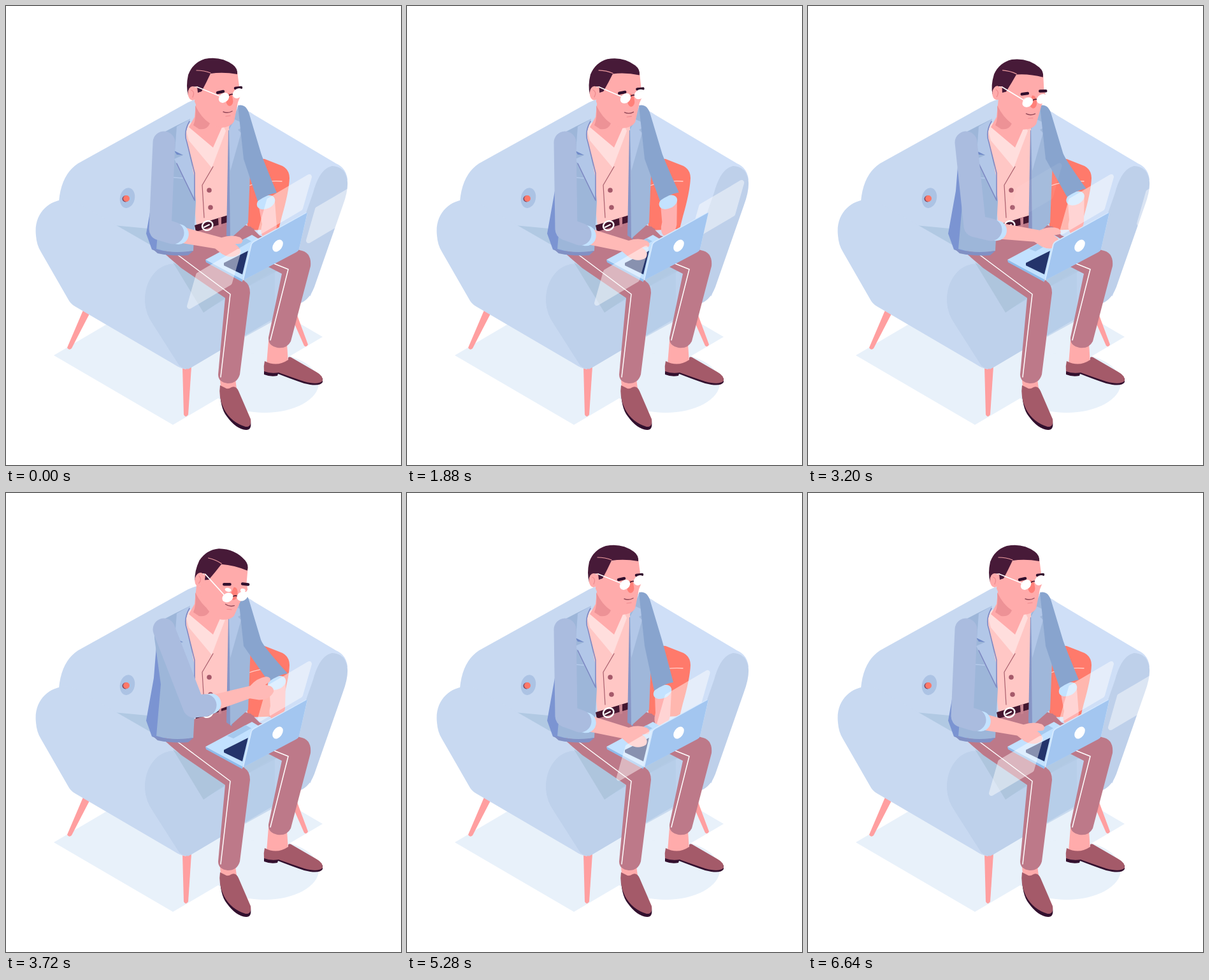
An HTML page for the animation above (6720 ms loop, 620 px wide and 720 px high).

```html
<!DOCTYPE html>
<html lang="en">
<head>
<meta charset="utf-8">
<title>Working on the sofa</title>
<style>
html, body { margin: 0; width: 100%; height: 100%; overflow: hidden; background: #fff; }
svg { display: block; width: 620px; height: 720px; }
.line { fill: none; stroke-linecap: round; stroke-linejoin: round; }
.panel { fill: #fff; stroke: #fff; stroke-width: 8; stroke-linejoin: round; }
</style>
</head>
<body>
<svg viewBox="0 0 620 720">
<defs>
  <path id="pane" class="panel" d="M6-7L20-56 83-93 69-44Z"/>
  <ellipse id="lens" rx="9" ry="7" fill="#fff" transform="rotate(-40)"/>
</defs>

<g id="floor" fill="#e8f1fa">
  <path d="M75 548L262 657 497 519 310 410Z"/>
  <ellipse cx="406" cy="591" rx="85" ry="47"/>
</g>

<g id="feet" fill="#ff9fa0">
  <path d="M122 475L132 481 103 537Q99 541 96 536Z"/>
  <path d="M277 566H291L286 641Q282 647 279 641Z"/>
  <path d="M450 492L457 485 474 531Q472 536 468 533Z"/>
</g>

<g id="sofa">
  <path fill="#c8d9f1" d="M83 306Q87 264 113 247L286 151Q325 132 370 162L400 400 240 400Z"/>
  <path fill="#cfdff7" d="M365 160Q380 163 390 171L518 247Q534 254 536 272L478 455 400 430Z"/>
  <path fill="#bed0ea" d="M536 276Q537 290 529 312L486 435Q478 461 460 467L440 480 455 370 482 293Q492 255 512 251Q534 252 536 276Z"/>
  <path fill="#b1c9e3" d="M148 342L222 349 330 380H430V440L310 490 200 430Z"/>
  <path fill="#bdd2ed" d="M270 485L310 480 350 456 440 408 468 440 460 467 285 570Z"/>
  <path fill="#b4cbe8" d="M384 437L422 414V493L375 519Z" opacity=".6"/>
  <path fill="#c8d9f1" d="M47 360C43 324 70 302 97 304Q105 305 114 310L255 391 275 405 283 570Q274 569 262 561L108 471Q101 467 97 459L55 386Q48 375 47 360Z"/>
  <path fill="#bed1eb" d="M218 464C217 426 242 401 268 405L311 480 350 457V532L291 567Q281 572 272 564L231 500Q219 483 218 464Z"/>
  <path fill="#aec5dd" d="M262 402L346 456 310 481Z"/>
  <ellipse cx="190.500" cy="301" rx="11.500" ry="16" fill="#acc3e4" transform="rotate(12 190 301)"/>
  <circle cx="187.500" cy="302.500" r="5" fill="#7c4560"/>
  <circle cx="189" cy="302" r="5" fill="#ff7869"/>
</g>

<g id="pillow">
  <path fill="#ff7a6b" d="M366 250Q390 237 406 240L434 251Q445 257 445 270Q444 292 433 330L428 350 380 352Z"/>
  <path class="line" stroke="#ffd0ca" stroke-width="1.300" d="M378 283Q405 273 433 275"/>
</g>

<g id="legs">
  <path fill="#ffabab" d="M412 525L441 530 443 560Q426 570 409 562Z"/>
  <path fill="#32102e" d="M405 570V578Q415 582 426 580L427 577Q450 586 468 592 492 598 497 590V584Z"/>
  <path fill="#a45a69" d="M406 557Q404 565 405 573 415 577 428 575 450 583 468 589 490 595 497 588 498 580 487 574L449 552Q442 548 443 555 425 567 406 557Z"/>
  <path fill="#bd7989" d="M352 342L384 346 398 360 461 383Q480 386 478 408L447 526Q441 538 426 536 411 533 412 520L433 420 398 402 350 390Z"/>
  <path class="line" stroke="#fff" stroke-width="1.500" d="M418 403L443 413 415 524"/>
  <path fill="#ffabab" d="M336 585H360L362 600Q350 606 337 600Z"/>
  <path fill="#32102e" d="M336 602Q336 630 346 643 361 664 377 665 386 665 384 652Z"/>
  <path fill="#a45a69" d="M336 595Q333 613 342 632 353 653 376 660 386 661 384 648L365 604Q361 595 354 598 348 602 344 599Z"/>
  <path fill="#bd7989" d="M246 386L297 354 352 333 390 350 368 380 345 400 375 432Q383 437 383 450L367 578Q363 592 348 592 333 590 333 578L344 458 275 411Z"/>
  <path class="line" stroke="#fff" stroke-width="1.500" d="M265 387L352 452 337 582"/>
</g>

<g id="torso">
  <path fill="#ffc7c5" d="M281 188L350 185 353 333 300 352Z"/>
  <path fill="#ffdedd" d="M281 190L290 183 340 186 345 196 323 254 287 211Z"/>
  <path fill="#ffabab" d="M299 145L350 160 340 188 325 222 287 190 296 174Z"/>
  <path fill="#ed9296" d="M297 156Q307 176 320 184 316 195 303 193L294 187Q299 176 297 156Z"/>
  <path class="line" stroke="#a85f6d" stroke-width="1.200" d="M325 252L308 281 311 332"/>
  <g fill="#a5596a"><circle cx="319" cy="289" r="3.800"/><circle cx="321" cy="316" r="3.800"/></g>
  <path fill="#43162f" d="M296 344L352 327V338L298 354Z"/>
  <path fill="#c98491" d="M333 333L338 331V346L334 347Z"/>
  <ellipse cx="316" cy="344.500" rx="8.500" ry="7" class="line" stroke="#fff" stroke-width="2.500" transform="rotate(-25 316 344)"/>
  <path class="line" stroke="#fff" stroke-width="2" d="M311 347L319 343"/>
  <path fill="#7b94d2" d="M238 215L232 290 220 357 229 382 250 390 252 240Z"/>
  <path fill="#9db6d9" d="M289 177L265 189 240 202Q230 212 234 235L243 300 236 381Q265 390 294 384L298 306 291 240 279 208Z"/>
  <path fill="#8190c4" d="M230 381Q262 389 294 384L286 391Q262 393 238 388Z"/>
  <path fill="#b2c7e8" d="M289 177L268 189 265 228 278 234 264 240 297 304 296 270 283 212 282 195Z"/>
  <path class="line" stroke="#7d87c2" stroke-width="1.500" d="M288 181Q278 198 284 214L296 262V305L268 247"/>
  <path fill="#708ac8" d="M264 227L278 234 268 233Z"/>
  <path class="line" stroke="#b5caeb" stroke-width="1.500" d="M252 268L277 270"/>
  <path fill="#8795c6" d="M349 195H352L355 366 346 360Z"/>
  <path fill="#9fb7da" d="M350 190L365 157Q377 153 380 169L384 240 380 340 352 365 351 290Z"/>
  <path fill="#b2c7e8" d="M350 194L359 178 366 181 376 188 364 194 369 199 352 259Z"/>
</g>

<path id="farSkin" fill="#ffb1b0"/>
<ellipse id="farCuff" rx="15" ry="10" fill="#c3e2ff"/>
<path id="farSleeve" fill="#88a4ce"/>

<g id="head">
  <path fill="#ffabab" d="M298 122L320 99 363 103 366 126 370 136 364 151 358 181Q353 190 338 191 317 187 303 166L296 150Z"/>
  <path fill="#471a38" d="M286 140Q282 126 286 108 293 89 312 83 337 78 356 92 364 98 363 107 341 103 321 106 315 119 307 134L301 136 300 126 292 127Z"/>
  <path class="line" stroke="#ef9da0" stroke-width="1.200" d="M299 101Q311 101 321 105"/>
  <ellipse cx="293" cy="137" rx="7.500" ry="11" fill="#ffabab"/>
  <path class="line" stroke="#ee8c90" stroke-width="1.300" d="M291 132Q297 135 293 143"/>
  <path fill="#ff8079" d="M348 137Q354 135 356 146 358 155 351 157 344 155 346 146Z"/>
  <path class="line" stroke="#914858" stroke-width="1.400" d="M341 166Q348 169 355 165"/>
  <path class="line" stroke="#ee8c90" stroke-width="1.200" d="M345 173L352 172"/>
  <g id="eyes" fill="#fff"><ellipse cx="340" cy="143" rx="5" ry="3"/><ellipse cx="363" cy="139" rx="4" ry="3"/></g>
  <path class="line" stroke="#32102e" stroke-width="4.500" d="M332 136L341 134M360 129L369 128"/>
  <g id="glasses">
    <path id="temple" class="line" stroke="#fff" stroke-width="1.700"/>
    <path class="line" stroke="#43162f" stroke-width="1.600" d="M349 141Q353 137 358 139"/>
    <use href="#lens" x="342" y="144" transform="translate(342 144)" style="x:0;y:0"/>
    <use href="#lens" transform="translate(364 137)"/>
  </g>
</g>

<use id="up" href="#pane"/>
<use id="right" href="#pane"/>

<g id="base">
  <path fill="#8fbcec" d="M313 398L371 427V433L314 402Z"/>
  <path fill="#c2e1ff" d="M313 398L386 359 408 372 371 429Z"/>
  <path fill="#a5c9ee" d="M347 381L376 364 385 369 357 385Z"/>
  <path fill="#24346b" d="M342 403L380 384 371 421 342 407Z"/>
</g>

<g id="near">
  <path id="nearSkin" fill="#ffb9b6" d="M6-13L76-10Q90-19 104-17 112-14 108-8L99-5Q112 0 109 9 99 20 83 15L70 9 6 13Z"/>
  <path id="nearCuff" class="line" stroke="#c3e2ff" stroke-width="32"/>
  <path id="nearSleeve" class="line" stroke="#aabcdf" stroke-width="35"/>
</g>

<use id="left" href="#pane"/>

<g id="lid">
  <path fill="#d6eaff" d="M371 431L384 374Q385 371 388 369L471 324 473 325 460 381Q459 384 456 385Z"/>
  <path fill="#a3c6f0" d="M373 430L386 374Q387 372 390 370L473 324 460 381Q459 384 456 386Z"/>
  <ellipse cx="426.500" cy="376" rx="10.500" ry="7" fill="#fff" transform="rotate(-55 426.500 376)"/>
</g>
</svg>

<script>
const LOOP = 6720, STEP = 40;
const $ = id => document.getElementById(id);
const shift = ([x, y], dx, dy) => [x + dx, y + dy];

// near arm: elbow x, y, sleeve end x, y, hand angle
const rest = [242, 350, 262, 356, 13];
const type = [250, 350, 272, 358, 15];
const reach = [262, 345, 287, 351, 8];
const raise = [295, 335, 313, 333, -16];
const rub = [356, 274, 358, 257, -96];

// far arm: cuff x, y, hand x, y
const idle = [408, 308, 412, 350];
const tap = [401, 312, 400, 353];
const swipe = [413, 306, 414, 345];
const lift = [425, 298, 425, 342];

// head: tilt, glasses slide, eyes shown
const ahead = [0, 0, 0], down = [8, 0, 0], peer = [12.5, 11, 1], bowed = [10.5, 1, 0];

// panel stops: x, y
const hinge = [371, 431], dock = [393, 361], leftStop = [282, 478], rightStop = [469, 375];
const nudged = shift(leftStop, 10, -5);
const shown = p => [...p, 1], gone = p => [...p, 0];

// each leg: begin, end, pose reached; the pose then holds until the next leg
const jump = (time, pose) => [time, time, pose];
const rise = time => [jump(time, shown(hinge)), [time, time + 560, shown(dock)]];
const swipeRight = time => [jump(time, shown(dock)), [time, time + 600, shown(rightStop)]];

const legs = {
  near: [[160, 1000, type], [2120, 2640, reach], [3440, 3720, raise], [3760, 4200, rub],
    [4480, 5000, type], [5960, 6560, rest]],
  far: [[240, 960, tap], [1480, 2080, swipe], [2880, 3480, lift], [3760, 4280, idle],
    [4880, 5200, tap], [5960, 6480, idle]],
  head: [[240, 840, down], [1440, 2040, ahead], [2880, 3680, peer], [4000, 4240, bowed],
    [4480, 4840, ahead]],
  up: [jump(1520, gone(dock)), ...rise(2320), ...rise(4880), ...rise(5960)],
  right: [[400, 1400, gone(shift(rightStop, 18, -88))], ...swipeRight(1520),
    [2840, 3480, gone(shift(rightStop, 76, -45))], ...swipeRight(5960)],
  left: [[160, 960, shown(nudged)], [2080, 3320, gone(shift(nudged, 20, -133))],
    jump(4960, shown(hinge)), [4960, 5600, shown(leftStop)]]
};

function at(name, t) {
  const track = legs[name], n = track.length;
  let i = n - 1;
  while (i >= 0 && track[i][0] > t) i--;
  if (i < 0) return track[n - 1][2];
  const [begin, end, to] = track[i], from = track[(i + n - 1) % n][2];
  const u = Math.min(1, (t - begin) / Math.max(1, end - begin));
  const k = begin === end ? 1 : u * u * (3 - 2 * u);
  return to.map((v, j) => from[j] + (v - from[j]) * k);
}

const set = (id, attrs) => {
  for (const name in attrs) $(id).setAttribute(name, attrs[name]);
};

function drawPanel(id, t) {
  const [x, y, life] = at(id, t);
  set(id, { transform: `translate(${x} ${y})`, opacity: .46 * (1 - (1 - life) ** 6) });
}

function drawNear(t) {
  const [ex, ey, x, y, angle] = at('near', t);
  const r = angle * Math.PI / 180;
  set('nearSleeve', { d: `M248 214L${ex} ${ey} ${x} ${y}` });
  set('nearCuff', { d: `M${x} ${y}l${9 * Math.cos(r)} ${9 * Math.sin(r)}` });
  set('nearSkin', { transform: `translate(${x} ${y}) rotate(${angle})` });
}

function drawFar(t) {
  const [x, y, hx, hy] = at('far', t);
  set('farSleeve', {
    d: `M364 156Q377 153 382 170L400 230Q403 240 ${x + 17} ${y - 15}Q${x + 3} ${y - 13} ${x - 13} ${y - 2}L373 240Z`
  });
  set('farCuff', { transform: `translate(${x} ${y}) rotate(-25)` });
  set('farSkin', {
    d: `M${x - 12} ${y + 3}L${x + 14} ${y - 1}L${hx + 13} ${hy - 4}q-3 18-21 17q-6-7-2-21Z`
  });
}

function drawHead(t) {
  const [tilt, slide, eyes] = at('head', t);
  set('head', { transform: `translate(${tilt * .1} ${tilt * .12}) rotate(${tilt} 310 180)` });
  set('glasses', { transform: `translate(0 ${slide})` });
  set('temple', { d: `M300 ${127 - slide}L337 142` });
  set('eyes', { opacity: eyes });
}

function draw(now) {
  const t = Math.floor((now % LOOP) / STEP) * STEP;
  drawHead(t);
  drawFar(t);
  drawNear(t);
  for (const id of ['up', 'right', 'left']) drawPanel(id, t);
}

const start = performance.now();
function tick() {
  draw(performance.now() - start);
  requestAnimationFrame(tick);
}
tick();
</script>
</body>
</html>
```
